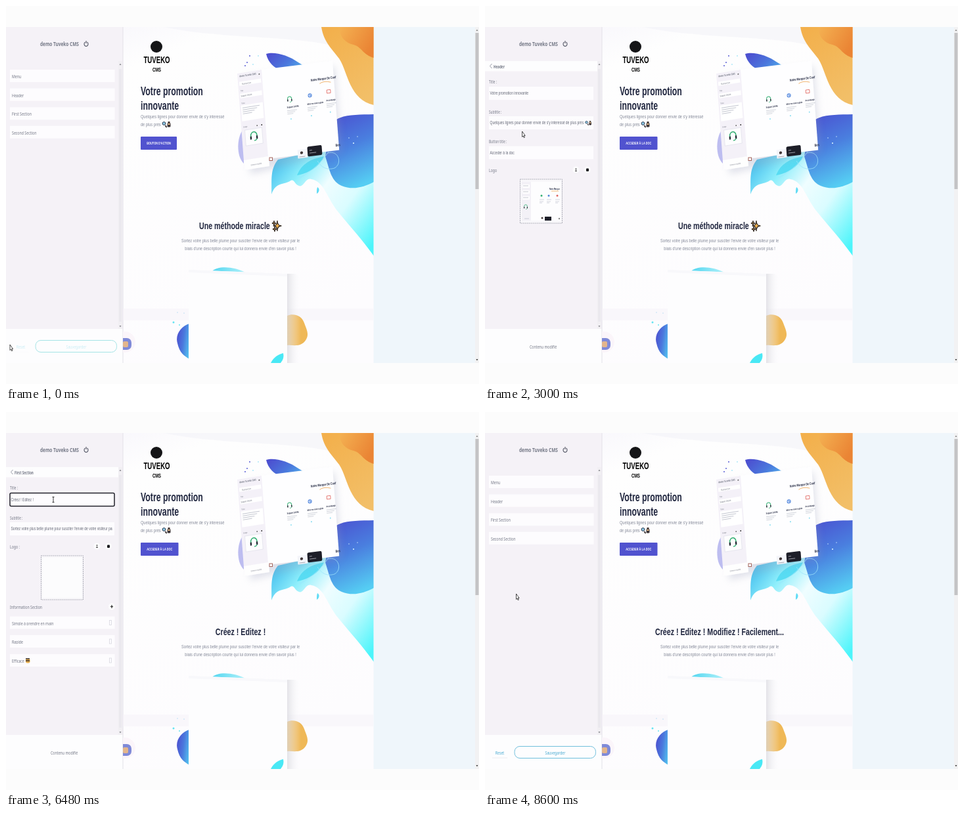
Recreate the animation shown at these times as an HTML page. Size 720 by 576 pixels, loop 8640 ms.

```html
<!DOCTYPE html>
<html lang="fr">
<head>
<meta charset="utf-8">
<title>demo Tuveko CMS</title>
<style>
html, body { margin: 0; width: 100%; height: 100%; overflow: hidden; background: #fcfcfc; }
svg { display: block; width: 100vw; height: 100vh; font-family: "Liberation Sans", Arial, sans-serif; }
.ui { font-family: "Noto Sans", "Open Sans", sans-serif; fill: #747886; }
.in { fill: #666a78; }
.b { font-weight: 700; }
.h { font-weight: 700; fill: #20263f; }
.p { fill: #858a99; }
.mid { text-anchor: middle; }
.white { fill: #fff; }
.on { fill: #46a9d1; }
.off { fill: #c9edf5; }
</style>
</head>
<body>
<svg viewBox="0 0 720 576" preserveAspectRatio="none">
<defs>
  <linearGradient id="page" x2=".3" y2="1"><stop stop-color="#f9f8fc"/><stop offset=".12" stop-color="#fefefe"/><stop offset="1" stop-color="#fdfcfe"/></linearGradient>
  <linearGradient id="orange" x1=".2" y1="0" x2=".7" y2="1"><stop stop-color="#f3b04c"/><stop offset="1" stop-color="#f2bf68"/></linearGradient>
  <linearGradient id="deep" x2="1" y2=".5"><stop stop-color="#f4b152"/><stop offset="1" stop-color="#ea8434"/></linearGradient>
  <linearGradient id="blue" x1="0" y1=".3" x2="1" y2=".7"><stop stop-color="#4c50d0"/><stop offset=".5" stop-color="#4b78dd"/><stop offset="1" stop-color="#52bdee"/></linearGradient>
  <linearGradient id="sea" x1=".3" y1="0" x2=".6" y2="1"><stop stop-color="#4a55d2"/><stop offset=".45" stop-color="#4a7fdf"/><stop offset="1" stop-color="#55cdf3"/></linearGradient>
  <linearGradient id="cyan" gradientUnits="userSpaceOnUse" x1="404" y1="250" x2="559" y2="362"><stop stop-color="#4fc5f0"/><stop offset=".2" stop-color="#8eeefb"/><stop offset=".42" stop-color="#effdff"/><stop offset=".65" stop-color="#dafcff"/><stop offset="1" stop-color="#4cf5fb"/></linearGradient>
  <linearGradient id="crest"><stop stop-color="#52d6f0"/><stop offset="1" stop-color="#b4f2fa"/></linearGradient>
  <linearGradient id="shade"><stop stop-color="#d8d8de"/><stop offset="1" stop-color="#fdfdfe" stop-opacity="0"/></linearGradient>
  <filter id="soft" x="-20%" y="-20%" width="140%" height="150%"><feGaussianBlur stdDeviation="6"/></filter>
  <clipPath id="view"><rect x="178" y="32" width="381.5" height="512"/></clipPath>
  <clipPath id="field"><rect x="6" y="100" width="156" height="140"/></clipPath>
</defs>
<g id="still"></g>
<g id="live"></g>
</svg>
<script>
const LOOP = 8640, STEP = 40;
const ACTION = "Acceder à la doc", TITLE = "Créez ! Editez ! Modifiez ! Facilement...";
const PITCH = "Sortez votre plus belle plume pour susciter l'envie de votre visiteur par le";
const INTRO = "Quelques lignes pour donner envie de s'y interessé";
const byId = id => document.getElementById(id);

// The whole screen is squeezed sideways by one ratio.
const text = (x, y, size, str, cls) =>
  `<text transform="translate(${x} ${y}) scale(.7 1)" font-size="${size}" class="${cls}">${str}</text>`;
const rect = (x, y, w, h, fill, more = "") =>
  `<rect x="${x}" y="${y}" width="${w}" height="${h}" fill="${fill}" ${more}/>`;
const dot = (x, y, r, fill, more = "") => `<circle cx="${x}" cy="${y}" r="${r}" fill="${fill}" ${more}/>`;
const path = (d, fill, more = "") => `<path d="${d}" fill="${fill}" ${more}/>`;
const line = (d, color, w = 1) => path(d, "none", `stroke="${color}" stroke-width="${w}"`);
const at = (x, y, s, body) => `<g transform="translate(${x} ${y}) scale(${s})">${body}</g>`;

const star = (x, y, r) => path(`M${x},${y - r}Q${x},${y} ${x + r * .8},${y}Q${x},${y} ${x},${y + r}Q${x},${y} ${x - r * .8},${y}Q${x},${y} ${x},${y - r}`,
  "#eeb04d", 'stroke="#3a312a" stroke-width="1.3"');
const sparkles = (x, y, s = 1) => at(x, y, s, star(1, 0, 8) + star(-4, -4, 4) + star(-3, 5, 4));
const face = (x, y) => rect(x - 3, y - 3, 6.5, 6.5, "#e8b04e", 'rx="2"') +
  line(`M${x - 3},${y - 3}H${x + 3}M${x - 3},${y}H${x + 3}`, "#352c2a", 1.3);
const search = (x, y, s) => at(x, y, s,
  line("M2,2L4,5", "#3a3030", 1.8) + dot(0, -1, 2.4, "#8fcbe8", 'stroke="#273248"') +
  rect(5, -2, 5, 6.5, "#3b3438", 'rx="1.5"') + rect(6, -4, 3, 2, "#4a3b35") + rect(6, -1, 3, 2, "#e7bb83"));
const headset = (x, y, s) => at(x, y, s,
  line("M-4,1V-1A4,4.5 0 0 1 4,-1V1", "#2fae70", 1.3) + rect(-5, 0, 2, 4, "#242c35") + rect(3, 0, 2, 4, "#242c35") +
  line("M4,4Q3,6 0,6", "#2fae70"));

function mockup() {
  const feature = (x, y, label) => text(x - 2, y + 13, 3.6, label, "h") +
    [17, 19.5, 22].map((d, i) => line(`M${x - 2},${y + d}h${15 - i * 3}`, "#c9ccd4", .8)).join("") + dot(x + 3, y + 30, .9, "#70d6ee");
  return path("M365,108L500,92L510,222L372,256Z", "#9aa0bb", 'opacity=".3" filter="url(#soft)"') +
    path("M362,187C351,198 350,229 362,240Z", "#bdbdf0") +
    `<g transform="matrix(1 -.16 .075 1 352 103)">` +
      rect(0, 0, 38, 147, "#f4f1f8") + text(3, 6, 4, "demo Tuveko CMS", "ui b") + dot(33, 6, 1, "#666") +
      rect(2, 13, 33, 6, "#fff") + text(6, 18, 3.5, "Mainsection", "ui") +
      text(3, 28, 3, "Title", "ui") + rect(2, 31, 33, 7, "#fff") + text(3, 36, 3.5, "Support 24/24h", "in") +
      text(3, 47, 3, "Texte", "ui") + rect(2, 49, 33, 24, "#fff") +
      [53, 56, 59, 62].map((y, i) => line(`M4,${y}h${26 - i * 4}`, "#b7bbc7", .8)).join("") +
      text(3, 83, 3, "Image", "ui") + dot(24, 83, .9, "#555") + dot(31, 83, .9, "#222") +
      rect(5, 87, 26, 24, "#fdfdfe", 'stroke="#dcdce8" stroke-width=".6"') + headset(18, 98, 1.15) +
      rect(0, 132, 38, 15, "#fefefe") + text(10, 142, 3, "Contenu modifié", "ui") +
    `</g><g transform="matrix(1 -.125 .075 1 389 97)">` +
      rect(0, 0, 108, 136, "#fefeff") + text(73, 27, 5.2, "Notre Marque De Conf", "h") +
      line("M86,32q7,-4 17,0", "#f0a650", .8) +
      headset(39, 50, .75) + dot(70, 48, 2.5, "#dce8ff", 'stroke="#4e83d9"') + line("M70,46.5v2h2", "#4e83d9", .8) +
      rect(96, 43, 5.5, 5, "#fff", 'stroke="#e0635d" stroke-width=".8"') +
      feature(36, 50, "Support 24/24h") + feature(67, 49, "Mise en route rapide") + feature(96, 47, "Accompagn") +
      rect(45, 128, 15, 13, "#f4f5fa") + dot(51, 133, 2.2, "#443a3a") + line("M47,139h9", "#9599a6", .8) +
      rect(60, 125, 22, 15, "#1d1e28", 'rx="2"') + line("M63,131h4M63,135h10", "#c8c8d0", .7) +
      text(103, 130, 5.5, "Bes", "h") +
    `</g>` + rect(401, 231, 4.5, 4.5, "#fff", 'stroke="#a5655c"');
}

function still() {
  const glints = [[371, 76], [384, 76], [364, 91], [376, 89], [367, 86], [522, 201], [529, 209], [535, 199]]
    .map(([x, y], i) => dot(x, y, i % 2 ? .7 : 1.1, i < 5 ? (i % 2 ? "#56cdf0" : "#6468d8") : "#d7f4ff")).join("");
  return rect(0, 32, 178, 512, "#f5f2f7") + rect(0, 492, 178, 52, "#fdfdfe") +
    rect(171, 84, 6, 408, "#f1eff3") + rect(172, 96, 4, 385, "#ebe9ee") +
    path("M172.5,90l1.5,-2.5l1.5,2.5ZM172.5,487l1.5,2.5l1.5,-2.5Z", "#8c8c92") +
    text(52, 61, 9.3, "demo Tuveko CMS", "ui b") +
    line("M120.5,55A3,3.4 0 1 0 123.5,55M122,53V57", "#525665", 1.1) +
    rect(559, 32, 155, 512, "#eff6fb") + rect(178, 32, 381.5, 512, "url(#page)") + line("M178,32V544", "#e3e1e8") +
    '<g clip-path="url(#view)">' +
    path("M240,32H481L495,60C430,45 320,50 240,32Z", "#f4f3f8", 'opacity=".6"') +
    rect(178, 461, 382, 18, "#f8f5fb", 'opacity=".65"') +
    path("M480,32C484,56 497,66 507,80C520,99 522,143 560,151V32Z", "url(#orange)") +
    path("M509,32C506,44 515,56 529,59C541,62 544,75 560,79V32Z", "url(#deep)") +
    path("M404,287C405,268 401,250 414,234L499,215C503,240 520,263 560,258V381C540,353 521,333 505,313C490,295 484,267 465,264C455,261 454,277 446,274C438,271 439,262 432,267C421,273 411,268 404,287Z", "url(#cyan)") +
    path("M474,276C478,278 477,284 473,286C473,282 473,279 474,276Z", "#61dcf5") +
    path("M443,258C449,242 462,233 484,229C478,243 464,254 443,258Z", "#58dcf3") +
    path("M495,178C512,164 533,166 560,165V268C545,276 528,281 511,274C494,267 492,247 486,229Z", "url(#sea)") +
    line("M490,224C507,219 512,241 500,247C491,250 481,248 474,236M447,262C467,250 479,240 491,222", "#9ee4fa", .8) +
    path("M396,73C408,69 430,75 445,86L465,98H420C408,95 399,86 396,73Z", "url(#blue)") +
    glints + mockup() +
    dot(229, 62, 9, "#151517") + text(229.5, 87, 13.8, "TUVEKO", "b mid") + text(229.5, 99.5, 8.3, "CMS", "b mid") +
    text(205, 135.5, 17.6, "Votre promotion", "h") + text(205, 157.5, 17.6, "innovante", "h") +
    text(205, 171, 8.04, INTRO, "p") + text(205, 183, 8.04, "de plus près", "p") + search(240.5, 180, 1) +
    text(357, 360, 8.04, PITCH, "p mid") +
    text(357, 372, 8.04, "biais d'une description courte qui lui donnera envie d'en savoir plus !", "p mid") +
    path("M314,404C322,396 346,396 366,407Z", "url(#crest)") +
    path("M428,472C437,468 450,471 454,483C458,494 463,502 454,512C446,520 436,516 428,517Z", "#efb857") +
    path("M279,484C267,488 257,500 261,514C264,528 271,533 279,538Z", "url(#blue)") +
    path("M428,408H440Q449,410 449,424V544H428Z", "url(#shade)", 'opacity=".7"') +
    path("M278,402L428,408V544H278Z", "#fdfdfe") + path("M278,402L428,408V412L278,406Z", "#f8f8fb") +
    path("M403,544C408,534 415,531 422,529Q424,537 418,544Z", "#49e8f5") +
    dot(255, 482, 1.5, "#65e4f2") + dot(264, 486, 1, "#65e4f2") + dot(261, 467, .8, "#b4dcf3") + dot(271, 468, .8, "#b4dcf3") +
    dot(181, 512, 16, "#fbf5fa") + rect(170, 506, 21, 18, "#7f8ad8", 'rx="7"') + rect(178, 511, 8, 9, "#e3b58c", 'rx="2"') +
    "</g>" +
    rect(714, 32, 6, 512, "#f2f2f3") + rect(714.5, 41, 5, 238, "#c3c3c5") +
    path("M715.5,38l1.5,-2.5l1.5,2.5Z", "#8a8a8a") + path("M715.5,538l1.5,2.5l1.5,-2.5Z", "#444");
}

// Straight motion between [time, ...values] keys.
function tween(keys, t) {
  const i = keys.findIndex(k => k[0] > t);
  if (i < 0) return keys.at(-1).slice(1);
  if (!i) return keys[0].slice(1);
  const a = keys[i - 1], b = keys[i], u = (t - a[0]) / (b[0] - a[0]);
  return a.slice(1).map((v, j) => v + (b[j + 1] - v) * u);
}
const typed = (str, keys, t) => str.slice(0, Math.floor(tween(keys, t)[0] + 1e-6));
const ACTION_KEYS = [[1600, 0], [1640, 1], [1680, 2], [1800, 2], [1840, 3], [2040, 6], [2120, 7], [2680, 16]];
const TITLE_KEYS = [[4760, 0], [4800, 1], [4840, 2], [5360, 9], [5440, 9], [6280, 14], [6360, 14], [6400, 15],
  [6440, 15], [6480, 16], [7200, 27], [7240, 27], [7280, 28], [7680, 34], [7960, 41]];
const POINTER = [[120, 6, 516], [400, 42, 133], [720, 42, 133], [1160, 77.5, 219.5], [2800, 77.5, 219.5],
  [2840, 68, 216], [2960, 68, 216], [3160, 11, 91], [3240, 11, 91], [3480, 45, 163], [3880, 45, 163],
  [4320, 72, 133.5], [7960, 72, 133.5], [8120, 11, 91], [8200, 11, 91], [8560, 47.5, 277]];

const item = (y, label) => rect(6, y, 159.5, 19, "#fdfcfe") + text(9, y + 13, 7.5, label, "ui");
const row = (y, label) => item(y, label) + rect(9, y + 13.4, 70, 3, "#fdfcfe") +
  rect(157.5, y + 6, 3, 7, "none", 'stroke="#d7d7df" stroke-width=".8"');
const label = (y, str) => text(6, y, 6.75, str, "ui");
const field = (y, str, focus) =>
  rect(6, y, 159, 20, "#fdfcfe", focus ? 'rx="2" stroke="#22222b" stroke-width="1.5"' : "") +
  `<g clip-path="url(#field)">${text(7.5, y + 12.3, 7.19, str, "in")}</g>`;
const back = str => rect(0, 84, 171, 15.5, "#fdfdfe") + line("M10.5,88L7.5,91.5L10.5,95", "#7d8190", .8) +
  text(13, 94.5, 6.7, str, "ui b");
const logoTools = y => dot(138.5, y, 5, "#fdfdfe") + line(`M138.5,${y - 2.5}v3.5M137,${y + 2}h3`, "#444") +
  dot(156, y, 5, "#fdfdfe") + rect(154, y - 2, 4, 4.5, "#17171c", 'rx="1"');
const thumb = y => rect(53.5, y, 64, 67, "#f8f7fa", 'stroke="#9b9ba8" stroke-width=".8" stroke-dasharray="2 1"');

function headerPanel(t, action) {
  const focus = t >= 1160 && t < 2960;
  const tiny = rect(56, 268, 59, 59, "#fdfdfe") + rect(56, 268, 14, 59, "#f3f1f7") +
    [272, 281, 290].map(y => rect(57, y, 11, 5, "#fff") + line(`M58,${y + 2}h8`, "#aeb1be", .7)).join("") +
    headset(62, 306, .6) + text(98, 280, 3.5, "Notre Marque", "h") + line("M101,282h11", "#f0a650", .8) +
    [86, 97, 110].map((x, i) => dot(x, 289, 1.5, ["#2fae70", "#4e83d9", "#e0635d"][i]) + line(`M${x - 3},295h7M${x - 3},298h6M${x - 3},300h4`, "#b7bbc7", .6)).join("") +
    rect(91, 321, 10, 6, "#1d1e28") + dot(87, 323, 1.5, "#443a3a") + dot(113, 324, 1.2, "#888") + line("M60,324h7", "#b7bbc7", .7);
  return back("Header") + label(118, "Title :") + field(123, "Votre promotion innovante") +
    label(163.5, "Subtitle :") + field(168, INTRO + " de plus près") + search(154.5, 178, .75) +
    label(208.5, "Button title :") + field(213.5, action + (focus ? "|" : ""), focus) +
    text(6, 252.5, 7.3, "Logo", "ui") + logoTools(249.5) + thumb(264) + tiny;
}

function sectionPanel(t, title) {
  const focus = t >= 4320, fresh = t < 4600;
  return back("First Section") + label(118, "Title :") +
    field(123.5, fresh ? "Une méthode miracle" : title + (t >= 7280 && t < 8040 ? "|" : ""), focus) + (fresh ? sparkles(60, 133, .5) : "") +
    label(163.5, "Subtitle :") + field(168, PITCH) +
    text(6, 208, 7.4, "Logo :", "ui") + logoTools(204.5) + thumb(219) + rect(56, 222, 59, 61, "#fcfcfd") +
    text(6, 299.5, 7.5, "Information Section", "ui") + dot(161, 296.5, 5, "#fdfdfe") + line("M159,296.5h4M161,294v5", "#222", 1.1) +
    row(311.5, "Simple à prendre en main") + row(340, "Rapide") + row(369, "Efficace") + face(33, 379);
}

const listPanel = () => ["Menu", "Header", "First Section", "Second Section"].map((s, i) => item(97 + i * 28.6, s)).join("");

const buttons = state => line("M11,527H34", state == "on" ? "#ececf0" : "#fafafc") +
  rect(45, 509.5, 123.5, 18, "#fdfdfe", `rx="8" stroke="${state == "on" ? "#70bfdc" : "#a5e4e6"}"`) +
  text(22.5, 522, 7.4, "Reset", "ui mid " + state) + text(107, 522, 7.4, "Sauvegarder", "ui mid " + state);

function pointer(t) {
  const [x, y] = tween(POINTER, t);
  const beam = (t >= 1080 && t < 2840) || (t >= 4240 && t < 8000);
  return `<g transform="translate(${x} ${y})">` + (beam
    ? line("M-1.5,-4H1.5M0,-4V4M-1.5,4H1.5", "#222", .9)
    : path("M0,0V8.5L1.5,7L2.7,9.7L3.8,9.2L2.7,6.5H4.6Z", "#fff", 'stroke="#222" stroke-width=".8"')) + "</g>";
}

function live(t) {
  const action = t < 1480 ? "Bouton d'action" : typed(ACTION, ACTION_KEYS, t);
  const title = typed(TITLE, TITLE_KEYS, t);
  const view = t < 720 || (t >= 3240 && t < 3720) || t >= 8200 ? "list" : t < 3240 ? "header" : "section";
  const panel = view == "list" ? listPanel() : view == "header" ? headerPanel(t, action) : sectionPanel(t, title);
  const footer = view == "list" ? buttons(t < 720 ? "off" : "on") : t >= 1480 ? text(68, 522, 7.5, "Contenu modifié", "ui") : "";
  const width = t < 1480 ? 55 : Math.max(48, 18 + action.length * 2.47);
  return panel + footer + rect(205, 199, width, 20, "#5153cf", 'rx="1"') +
    text(205 + width / 2, 211, 5.6, action.toUpperCase(), "b mid white") +
    (t < 4600 ? text(294, 340, 15.24, "Une méthode miracle", "h") + sparkles(412, 335)
      : text(357, 340, 15.24, title, "h mid")) + pointer(t);
}

byId("still").innerHTML = still();
const start = performance.now();
let last = -1;
function frame() {
  const t = Math.floor((performance.now() - start) % LOOP / STEP) * STEP;
  if (t != last) byId("live").innerHTML = live(last = t);
  requestAnimationFrame(frame);
}
frame();
</script>
</body>
</html>
```
